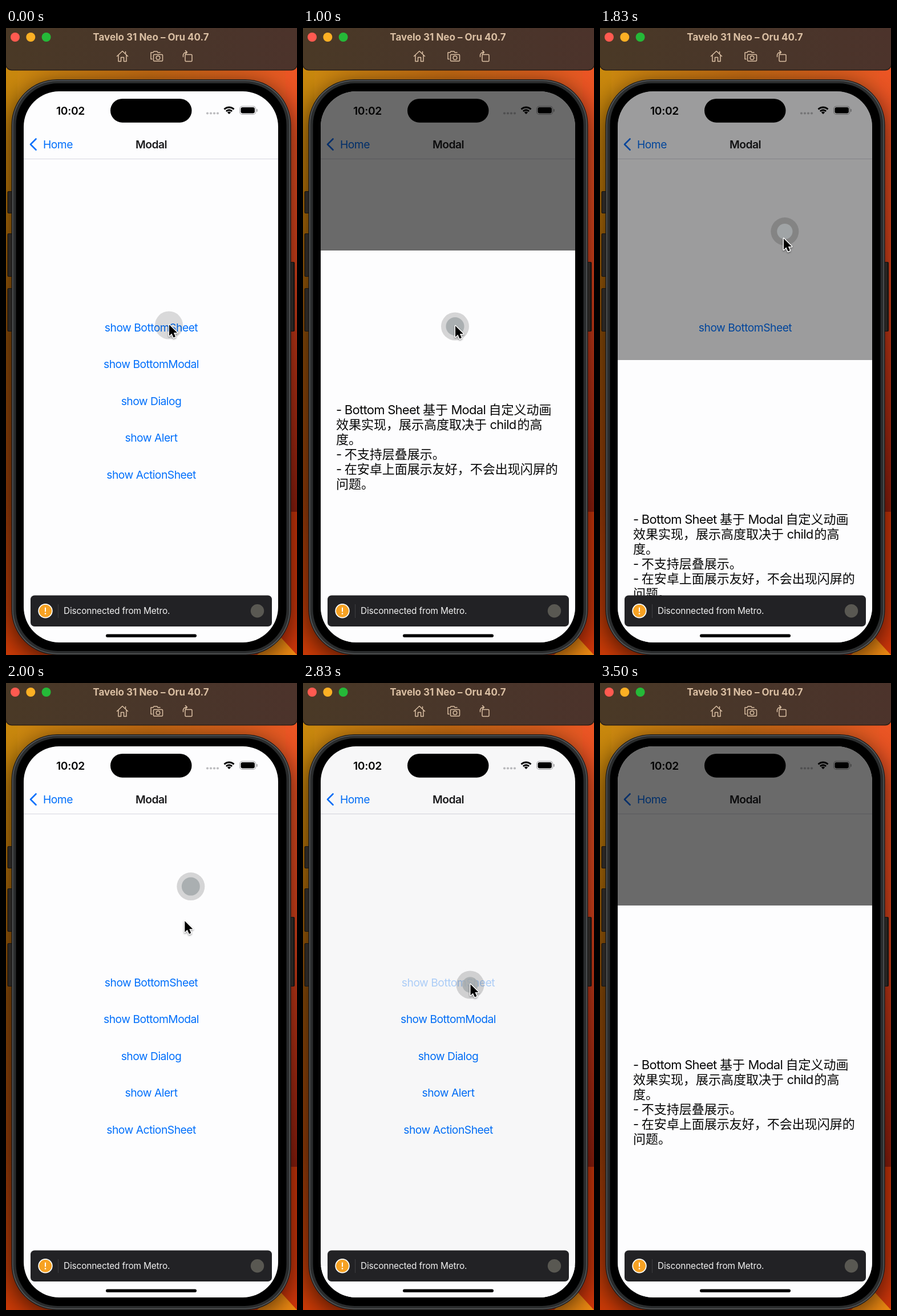
An HTML page with a canvas for the animation above (4160 ms loop, 510x1099 px).

```html
<!DOCTYPE html>
<html lang="en">
<head>
<meta charset="utf-8">
<title>Modal demo</title>
<style>
  html, body { margin: 0; width: 100%; height: 100%; overflow: hidden; background: #000; }
  canvas { display: block; width: 510px; height: 1099px; }
</style>
</head>
<body>
<canvas id="stage" width="510" height="1099"></canvas>
<script>
const ctx = document.getElementById('stage').getContext('2d');
const LOOP = 4160, STEP = 1000 / 12;
const LEFT = 31, TOP = 111, WIDTH = 446, BOTTOM = 1077, SHEET = 687, MID = 254.5;
const BLUE = '#006ffb', PAGE = '#fdfdfe', TAN = '#dabfa3';
const SANS = 'Inter, "Noto Sans CJK SC", "Noto Sans CJK JP", sans-serif';

const clamp = v => Math.max(0, Math.min(1, v));
const easeInOut = v => v < 0.5 ? 2 * v * v : 1 - 2 * (1 - v) ** 2;
const ramp = (t, start, length) => clamp((t - start) / length);

// Pointer moves: start, length, and where it goes
const HOME = { x: 286, y: 520 };
const MOVES = [
  { at: 83, length: 250, x: 267, y: 522 },
  { at: 1250, length: 250, x: 325, y: 352 },
  { at: 1660, length: 790, x: 293.5, y: 528 },
  { at: 2945, length: 320, x: 421, y: 1094 }
];
const SLIDES = [{ at: 740, dir: 1 }, { at: 1740, dir: -1 }, { at: 2783.5, dir: 1 }];
const TAPS = [580, 1660, 2660], HOLD = 505;

function pointerAt(t) {
  let { x, y } = HOME;
  for (const move of MOVES) {
    const k = easeInOut(ramp(t, move.at, move.length));
    x += (move.x - x) * k;
    y += (move.y - y) * k;
  }
  return { x, y };
}

const sheetAt = t => SLIDES.reduce((p, s) => p + s.dir * easeInOut(ramp(t, s.at, 250)), 0);

// Opacity of the tapped button
function tapFade(t) {
  const dip = TAPS.filter((_, i) => i !== 1)
    .reduce((sum, at) => sum + ramp(t, at + 10, 150) - ramp(t, at + 210, 260), 0);
  return 1 - 0.7 * dip;
}

function box(x, y, w, h, r, fill) {
  ctx.beginPath();
  ctx.roundRect(x, y, w, h, r);
  ctx.fillStyle = fill;
  ctx.fill();
}

function outline(x, y, w, h, r, color, width) {
  ctx.beginPath();
  ctx.roundRect(x, y, w, h, r);
  ctx.strokeStyle = color;
  ctx.lineWidth = width;
  ctx.stroke();
}

function disc(x, y, r, fill) {
  ctx.beginPath();
  ctx.arc(x, y, r, 0, Math.PI * 2);
  ctx.fillStyle = fill;
  ctx.fill();
}

function stroke(d, x, y, color, width) {
  ctx.save();
  ctx.translate(x, y);
  ctx.lineJoin = ctx.lineCap = 'round';
  ctx.strokeStyle = color;
  ctx.lineWidth = width;
  ctx.stroke(new Path2D(d));
  ctx.restore();
}

function text(str, x, y, size, color, { weight = 400, align = 'left', track = -0.027 } = {}) {
  ctx.font = `${weight} ${size}px ${SANS}`;
  ctx.letterSpacing = `${track * size}px`;
  ctx.textAlign = align;
  ctx.fillStyle = color;
  ctx.fillText(str, x, y);
}

// Latin runs are set tighter than CJK runs
function mixedText(str, x, y, size, color) {
  for (const run of str.match(/[\x20-\x7e]+|[^\x20-\x7e]+/g)) {
    text(run, x, y, size, color, { track: run.charCodeAt(0) < 128 ? -0.033 : 0 });
    x += ctx.measureText(run).width;
  }
}

function gradient(x, y, ...colors) {
  const g = ctx.createLinearGradient(0, 0, x, y);
  colors.forEach((c, i) => g.addColorStop(i / (colors.length - 1), c));
  return g;
}

function wallpaper() {
  box(0, 0, 510, 1099, 0, gradient(0, 1099, '#d0900f', '#b87408', '#8a4a08', '#963c08', '#cc3a06'));
  box(255, 0, 255, 848, 0, gradient(0, 848, '#f05a26', '#d8411a', '#8f1e0d'));
  box(255, 848, 255, 251, 0, '#cf360a');
  box(20, 0, 470, 160, 0, gradient(510, 0, '#cc8a0f', '#c46a12', '#ea5624'));
  ctx.beginPath();
  ctx.moveTo(476, 1062);
  ctx.lineTo(510, 1099);
  ctx.lineTo(440, 1099);
  ctx.fillStyle = '#ef8a12';
  ctx.fill();
}

function titleBar() {
  box(-1, -12, 512, 86.5, 11, '#2a1f17');
  box(0, -12, 510, 85, 10, gradient(510, 0, '#4a3926', '#49362a', '#4c332b'));
  ['#ff5a50', '#fcb024', '#25b938'].forEach((c, i) => disc(16 + i * 27.3, 16, 8, c));
  text('Tavelo 31 Neo – Oru 40.7', 254, 21.5, 17, TAN, { weight: 700, align: 'center', track: 0 });

  stroke('M-9.5 0 L0 -9 L9.5 0 M-7 -2 V9 H-2.5 V2 H2.5 V9 H7 V-2 M5.5 -8 V-5', 204, 49.5, TAN, 1.5);
  stroke('M-8 4.5 H-10 V-7 H-6 L-5 -9 H1 L2 -7 H6', 264, 50, TAN, 1.5);
  outline(258.5, 46.5, 16, 11.5, 1.5, TAN, 1.5);
  outline(263.2, 49, 6.6, 6.6, 3.3, TAN, 1.5);
  outline(314, 46.5, 12, 12, 1.5, TAN, 1.5);
  stroke('M0 8 Q-1 0 7 0 M4 -3 L7 0 L4 3', 310.5, 42.5, TAN, 1.5);
}

function phoneBody() {
  const button = (x, y, h) => {
    box(x - 1.5, y, 10, h, 2, '#1d1b18');
    box(x, y + 1, 6, h - 2, 1, '#3b3632');
  };
  button(4, 286, 39);
  button(4, 360, 76);
  button(4, 456, 76);
  button(497.5, 410, 122);

  ctx.save();
  ctx.shadowColor = 'rgba(0,0,0,.65)';
  ctx.shadowBlur = 40;
  ctx.shadowOffsetY = 10;
  box(9.5, 90, 490, 1009, 80, '#1c1c1c');
  ctx.restore();
  box(11, 91.5, 487, 1006, 78, '#56585a');
  box(12.5, 93, 484, 1003, 77, '#2a2c2d');
  box(17.5, 97, 474, 995, 73, '#000');
}

function statusBar() {
  text('10:02', 113, 152, 19.3, '#050505', { weight: 600, align: 'center', track: -0.02 });
  for (let i = 0; i < 4; i++) disc(353 + i * 6, 149.5, 2.1, '#bdbdc0');

  ctx.strokeStyle = '#000';
  ctx.lineCap = 'butt';
  for (const [r, width] of [[2.2, 4.4], [7.2, 2.9], [12, 2.9]]) {
    ctx.lineWidth = width;
    ctx.beginPath();
    ctx.arc(391, 151, r, -Math.PI * 0.75, -Math.PI * 0.25);
    ctx.stroke();
  }

  outline(409.7, 137.2, 28, 14.2, 4.5, '#a2a2a5', 1.1);
  box(411.5, 139, 24.4, 10.6, 3, '#000');
  box(439, 142, 1.7, 4.8, 1, '#a2a2a5');
}

function page(t) {
  box(LEFT, TOP, WIDTH, BOTTOM - TOP, 0, PAGE);
  statusBar();
  stroke('M9.5 -9.5 L0 0 L9.5 9.5', 43, 204, BLUE, 2.6);
  text('Home', 65, 211, 19.3, BLUE);
  text('Modal', MID, 211, 19.3, '#1b1b1d', { weight: 600, align: 'center' });
  box(LEFT, 229, WIDTH, 1, 0, '#d6d6e0');

  ['BottomSheet', 'BottomModal', 'Dialog', 'Alert', 'ActionSheet'].forEach((name, i) => {
    ctx.globalAlpha = i ? 1 : tapFade(t);
    text('show ' + name, MID, 531.5 + i * 64.5, 19.3, BLUE, { align: 'center' });
  });
  ctx.globalAlpha = 1;
}

function sheet(p) {
  if (p <= 0) return;
  box(LEFT, TOP, WIDTH, BOTTOM - TOP, 0, `rgba(0,0,0,${0.58 * p ** 1.25})`);
  const y = Math.round(BOTTOM - SHEET * p);
  box(LEFT, y, WIDTH, SHEET, 0, PAGE);
  [
    '- Bottom Sheet 基于 Modal 自定义动画',
    '效果实现，展示高度取决于 child\u200a的高',
    '度。',
    '- 不支持层叠展示。',
    '- 在安卓上面展示友好，不会出现闪屏的',
    '问题。'
  ].forEach((row, i) => mixedText(row, 58, y + 287 + i * 26, 22, '#060606'));
}

function toast() {
  box(43, 994.5, 423, 54.5, 7, '#222225');
  disc(69, 1021.7, 12.7, '#fff');
  disc(69, 1021.7, 11, '#f7a223');
  box(68, 1015.5, 2, 8, 1, '#fff');
  disc(69, 1026.5, 1.3, '#fff');
  box(91, 1010, 1, 24, 0, '#3d3d40');
  text('Disconnected from Metro.', 101, 1027.2, 15.4, '#f1f1f1', { track: -0.01 });
  disc(440.5, 1021.7, 11.7, '#595852');
  box(175, 1062.5, 159, 5.5, 2.7, '#000');
}

function touch(t) {
  if (t > 3120) return;
  // The ring stays behind while the sheet is sliding
  const slide = SLIDES.find(s => t > s.at && t < s.at + 400);
  const { x, y } = pointerAt(slide ? slide.at : t);
  const tap = TAPS.find(at => t >= at && t < at + HOLD);
  disc(x - 0.5, y + 1, 24.5, `rgba(0,0,0,${tap ? 0.155 : 0.14})`);
  if (tap) {
    const k = ramp(t, tap, 330);
    disc(x - 0.5, y + 1, 11 + 5 * k, `rgba(166,171,173,${0.75 + 0.15 * k})`);
  }
}

function cursor(t) {
  if (t > 3480) return;
  const { x, y } = pointerAt(t);
  const arrow = new Path2D('M0 0 V19.5 L4.4 15.4 L7.6 22.6 L11 21.1 L7.9 14 H14 Z');
  ctx.save();
  ctx.translate(x, y);
  ctx.lineJoin = 'round';
  ctx.lineWidth = 3;
  ctx.strokeStyle = '#fff';
  ctx.shadowColor = 'rgba(0,0,0,.4)';
  ctx.shadowBlur = 3;
  ctx.shadowOffsetY = 1.5;
  ctx.stroke(arrow);
  ctx.shadowColor = 'transparent';
  ctx.fillStyle = '#000';
  ctx.fill(arrow);
  ctx.restore();
}

function draw(t) {
  wallpaper();
  phoneBody();
  titleBar();
  ctx.save();
  ctx.beginPath();
  ctx.roundRect(LEFT, TOP, WIDTH, BOTTOM - TOP, 62);
  ctx.clip();
  page(t);
  sheet(sheetAt(t));
  box(183, 124, 142.5, 41.7, 20.8, '#000');
  toast();
  touch(t);
  ctx.restore();
  cursor(t);
}

const begin = performance.now();
function tick() {
  const t = (performance.now() - begin) % LOOP;
  // The picture advances 12 times per second
  draw(Math.floor((t + 5) / STEP) * STEP);
  requestAnimationFrame(tick);
}
tick();
</script>
</body>
</html>
```
